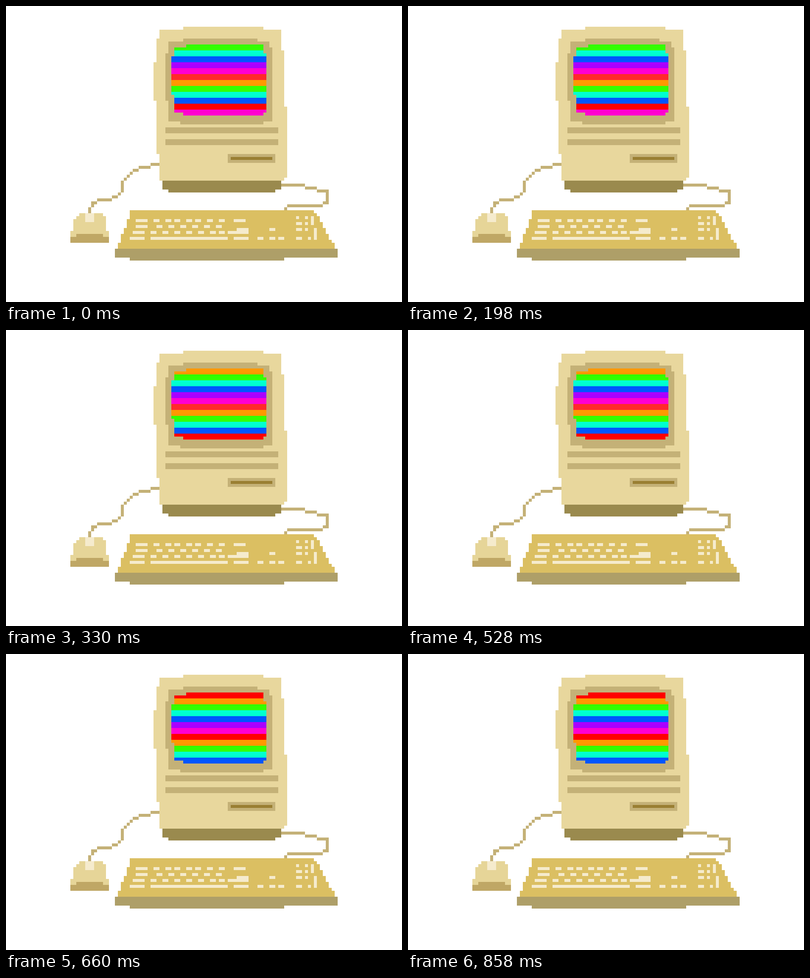
Write an HTML page that moves like this. It is 800x600 px and loops after 0.99 s.

```html
<!DOCTYPE html>
<html lang="en">
<head>
<meta charset="utf-8">
<title>Pixel computer</title>
<style>
  html, body { margin: 0; width: 100%; height: 100%; overflow: hidden; background: #fff; }
  svg { display: block; width: 800px; height: 600px; shape-rendering: crispEdges; }
  .case { fill: #e8d79d; }
  .trim { fill: #c4b177; }
  .line { fill: none; stroke: #c4b177; }
  .keys { fill: none; stroke: #f5ebcd; }

  .red { fill: #ff0000; }
  .orange { fill: #ff9900; }
  .green { fill: #33ff00; }
  .cyan { fill: #00ffd0; }
  .blue { fill: #0055ff; }
  .purple { fill: #aa00ff; }
  .pink { fill: #ff00d0; }

  .bars { animation: roll 990ms step-end infinite; }
  .glow { animation: dim 990ms step-end infinite; }
  @keyframes roll {
    0% { transform: translateY(-4px); }
    33.3333% { transform: translateY(-2px); }
    66.6667% { transform: translateY(0); }
  }
  @keyframes dim {
    0% { fill: #ff2a2a; }
    66.6667% { fill: #ff0000; }
  }
</style>
</head>
<body>
<svg viewBox="0 0 800 600">
  <defs>
    <clipPath id="screen">
      <path d="M61 13H87V16H88V36H87V37H60V36H57V30H56V17H57V14H61Z"/>
    </clipPath>
  </defs>
  <!-- one unit is one 6px art pixel -->
  <g transform="translate(-2 0) scale(6)">
    <!-- cables -->
    <path class="line" d="M52 53.5H49M49 54.5H45M45 55.5H43M43 56.5H42M42 57.5H41M41 58.5H40M39.5 59V63M39 63.5H38M38 64.5H36M36 65.5H31M31 66.5H29M30 67.5H29M28.5 68V70"/>
    <path class="line" d="M93 60.5H101M101 61.5H105M105 62.5H109M108.5 63V67M109 66.5H107M107 67.5H95M95 68.5H94"/>

    <!-- computer -->
    <path class="case" d="M60 7H87V8H93V15H94V34H95V58H94V59H52V50H51V32H50V19H51V11H52V8H60Z"/>
    <path class="trim" d="M60 11H85V12H89V14H90V39H87V40H59V39H55V32H54V16H55V12H60Z"/>
    <path class="trim" d="M54 41H92V43H54ZM54 45H92V47H54ZM75 50H91V53H75Z"/>
    <path fill="#9a7f33" d="M76 51H90V52H76Z"/>
    <path fill="#9a8a4e" d="M53 59H93V62H91V63H55V62H53Z"/>

    <!-- screen -->
    <g clip-path="url(#screen)">
      <g class="bars">
        <rect class="red" x="56" y="13" width="32" height="2"/>
        <rect class="orange" x="56" y="15" width="32" height="2"/>
        <rect class="green" x="56" y="17" width="32" height="2"/>
        <rect class="cyan" x="56" y="19" width="32" height="2"/>
        <rect class="blue" x="56" y="21" width="32" height="2"/>
        <rect class="purple" x="56" y="23" width="32" height="2"/>
        <rect class="pink" x="56" y="25" width="32" height="2"/>
        <rect class="glow" x="56" y="27" width="32" height="2"/>
        <rect class="orange" x="56" y="29" width="32" height="2"/>
        <rect class="green" x="56" y="31" width="32" height="2"/>
        <rect class="cyan" x="56" y="33" width="32" height="2"/>
        <rect class="blue" x="56" y="35" width="32" height="2"/>
        <rect class="red" x="56" y="37" width="32" height="2"/>
        <rect class="pink" x="56" y="39" width="32" height="2"/>
      </g>
    </g>

    <!-- mouse -->
    <path fill="#e6d598" d="M25 70H33V71H34V76H35V78H22V76H23V72H24V71H25Z"/>
    <path fill="#f5ebcd" d="M27 70H30V73H27Z"/>
    <path fill="#bfa765" d="M24 77H33V78H35V80H22V78H24Z"/>

    <!-- keyboard -->
    <path fill="#dbbf62" d="M42 69H104V70H105V71H106V73H107V75H108V77H109V79H110V80H111V82H38V80H39V77H40V75H41V72H42Z"/>
    <path fill="#ae9f68" d="M37 82H112V85H94V86H42V85H37Z"/>
    <path class="keys" d="M44 72.5h4m2 0h2m2 0h2m1 0h2m2 0h2m1 0h2m2 0h2m2 0h2m3 0h4"/>
    <path class="keys" d="M44 74.5h4m3 0h2m2 0h2m2 0h2m2 0h2m2 0h2m2 0h2"/>
    <path class="keys" d="M43 76.5h4m2 0h2m2 0h2m2 0h2m2 0h2m2 0h2m2 0h2m1 0h2m1 0h7M78 75.5h4m7 0h2"/>
    <path class="keys" d="M42 78.5h5m2 0h26m2 0h5m3 0h2m2 0h2m1 0h2"/>
    <path class="keys" d="M98 71.5h1m2 0h1M98 73.5h2m1 0h1M98 75.5h2m1 0h1M98 78.5h2m2 0h1M103.5 71v3M104.5 75v4"/>
  </g>
</svg>
</body>
</html>
```
